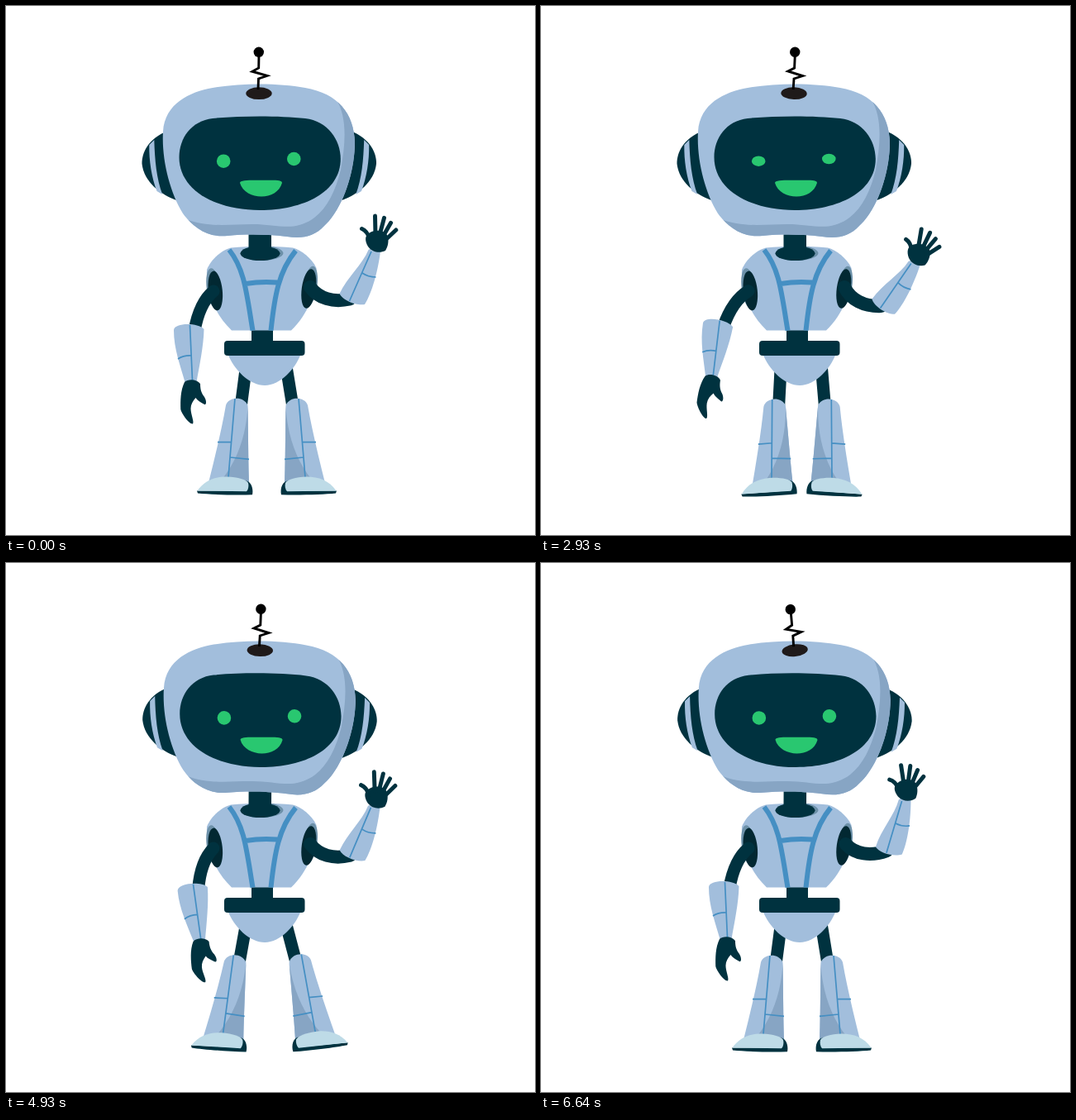
Write an HTML page that moves like this. It is 640 by 640 pixels and loops after 6710 ms.

```html
<!DOCTYPE html>
<html lang="en">
<head>
<meta charset="utf-8">
<title>Waving robot</title>
<style>
  html, body { margin: 0; width: 100%; height: 100%; overflow: hidden; background: #fff; }
  svg { display: block; width: 100vw; height: 100vh; }
  .light { fill: #a2bedc; }
  .shade { fill: #87a5c4; }
  .dark { fill: #00323f; }
  .green { fill: #29c770; }
  .rim { fill: #6d91a9; }
  .hole { fill: #022832; }
  .limb { fill: none; stroke: #00323f; stroke-linecap: round; }
  .seam { fill: none; stroke: #458fc3; stroke-width: 1.7; }
  .strap { fill: none; stroke: #458fc3; stroke-width: 6; }
</style>
</head>
<body>
<svg viewBox="0 0 640 640">
  <defs>
    <path id="skull" d="M190 152C192 118 222 104 250 99C285 93 330 93 362 99C402 106 421 130 422 165C422 200 408 245 385 266C373 279 358 282 340 279C312 276 292 276 268 278C242 281 224 265 214 251C198 225 188 185 190 152Z"/>
    <clipPath id="skullClip"><use href="#skull"/></clipPath>
    <g id="ear">
      <path class="dark" d="M196 151C172 160 164 178 164.500 191C167 213 187 228 206 235Z"/>
      <path class="light" d="M173.300 168L179.300 162C180 186 182 209 189.300 228L182.500 224C176 207 173 187 173.300 168Z"/>
    </g>
    <g id="shin">
      <path class="light" d="M266 483C269 473 287 471 292.500 483C293 512 293 548 294 579H244.500C253 545 261 512 266 483Z"/>
      <path class="shade" d="M292.500 484C291 516 281 549 261 573L294 579C293 548 293 512 292.500 484Z"/>
      <path class="seam" d="M277 475L269 570M256 527.700H273M271 546L294 548.300"/>
      <path class="dark" d="M231 586.500H289L288 574C297 574 299.500 584 298 591.300C275 592 247 591 232 589.500Z"/>
      <path fill="#bedbe7" d="M231.500 586.500C240 574 253 569.500 267 569.500C281 570 291 573 293 577C294 581 293 585 291 587.300Z"/>
    </g>
  </defs>

  <g id="legL">
    <path class="limb" stroke-width="15" d="M290.500 436L284.500 482"/>
    <use href="#shin"/>
  </g>
  <g id="legR">
    <path class="limb" stroke-width="15" d="M339 436L346.500 482"/>
    <use href="#shin" transform="translate(631 0) scale(-1 1)"/>
  </g>

  <path class="light" d="M268 420H357C351 438 332 459 313 459C295 459 276 441 268 420Z"/>
  <path class="dark" d="M297 390H323V408H297Z"/>
  <rect class="dark" x="264" y="405" width="97.500" height="18" rx="4"/>

  <path class="light" d="M272 292.500C295 290 325 290 347 292.500C357 295 370 305 375.500 317C377 342 367 371 345 392.500H273C251 371 242 345 243 319C248 306 262 295 272 292.500Z"/>
  <path class="strap" d="M270 295C289 319 291 348 298.500 392.500M350.500 296C330 321 325 350 320.500 392.500M290 336Q308 333 328 334.500"/>
  <ellipse class="rim" cx="310" cy="299" rx="25.500" ry="8.800"/>
  <ellipse class="dark" cx="307.500" cy="299.300" rx="24" ry="8.800"/>
  <ellipse class="rim" cx="251.300" cy="342" rx="8.500" ry="25" transform="rotate(-8 251.300 342)"/>
  <ellipse class="hole" cx="253.300" cy="344.500" rx="8.500" ry="24" transform="rotate(-6 253.300 344.500)"/>
  <ellipse class="rim" cx="367.800" cy="339.500" rx="8.500" ry="25" transform="rotate(9 367.800 339.500)"/>
  <ellipse class="hole" cx="366.300" cy="342" rx="8.500" ry="24" transform="rotate(8 366.300 342)"/>

  <g id="armL">
    <path class="limb" stroke-width="15" d="M251 345C239 355 232 370 228 393"/>
    <path class="light" d="M203 392C204 383 232 383 239.500 391C239 412 234 435 230.500 455H216.500C211 435 203 415 203 392Z"/>
    <path class="seam" d="M222.500 386L225.500 453M208 427Q215 422.500 224 423"/>
    <path class="dark" d="M216 455C220 451 231 451 235 457C235 463 236 468 240 473C243 478 242.500 483 240 482C235 479 231 477 229.500 474C226 478 223.500 482 223.500 487C223.500 494 228 503 226 505.500C221 506 212 492 211.300 488C211 478 211 465 216 455Z"/>
  </g>

  <g id="armR">
    <path class="limb" stroke-width="16" d="M368 340C378 354 396 359 416 354.500"/>
    <path class="light" d="M403.500 348C407 356 424 363 434 361C443 347 450 320 453 297C448 293 442 292 438.500 295C431 313 413 328 403.500 348Z"/>
    <path class="seam" d="M415.500 357L442 297M431 323Q438 328 447.500 328"/>
    <path class="dark" d="M438 291C434 284 434 278 439 275C446 270 457 271 461 277C464 284 462 291 459 296C453 299 444 299 438 291Z"/>
    <path class="limb" stroke-width="5" d="M430.500 269.500Q437 272 440 282M446.500 254L447 277M457.500 256.300L452 277M465.600 262.300L456 279M471.800 271L458 284"/>
  </g>

  <g id="head">
    <path class="dark" d="M293.500 268H321V301Q321 305.500 307 305.500Q293.500 305.500 293.500 301Z"/>
    <use href="#ear"/>
    <use href="#ear" transform="translate(612.500 0) scale(-1 1)"/>
    <use href="#skull" class="light"/>
    <path class="shade" clip-path="url(#skullClip)" d="M399 112C413 134 411 165 405 198C396 235 379 262 348 266.500C333 268 318 264 298 264C268 264 243 269 213 256V292H432V112Z"/>
    <path class="dark" d="M250 136C285 132.500 330 132.500 362 136C389 139 404.800 162 404.800 185C404.800 225 360 247 307 247C252 247 209.500 222 209.500 183C209.500 160 224 139 250 136Z"/>
    <circle id="eyeL" class="green" cx="263.200" cy="187.700" r="8.300"/>
    <circle id="eyeR" class="green" cx="348.300" cy="185" r="8.300"/>
    <path id="mouth" class="green" d="M283 214C283 210.500 294 210.800 309 210.800C324 210.800 334 210 334 214C331 225 320 230.500 309 230.500C298 230.500 286 225 283 214Z"/>
    <g id="antenna">
      <ellipse cx="306" cy="105.700" rx="15.700" ry="7.400" fill="#1f1a1a"/>
      <path fill="none" stroke="#000" stroke-width="2.900" d="M306 58L305.700 75L298 79.200L316 84.300L305.500 88L305 101"/>
      <circle cx="305.800" cy="55.800" r="6.200"/>
    </g>
  </g>
</svg>
<script>
  const LOOP = 6710, HOLD = 1070, STEP = 71.4, LAST = 79;
  const TAU = 2 * Math.PI;

  const get = id => document.getElementById(id);
  const ease = u => (1 - Math.cos(Math.PI * Math.min(1, u))) / 2;

  // Cosine with its crests at `crest` plus whole periods.
  const wave = (s, crest, period) => Math.cos(TAU * (s - crest) / period);

  // Narrow repeating bump from 0 to 1.
  const pulse = (s, crest, period) => ((1 + wave(s, crest, period)) / 2) ** 4;

  // Distance to the nearest moment of a repeating event.
  const gap = (s, at, period) => Math.abs(s - at - period * Math.round((s - at) / period));

  // One step outwards, then one inwards: 1 is fully out, -1 fully in.
  function stride(s) {
    const u = s < 35 ? s / 35 : Math.max(0, s - 40) / (LAST - 40);
    return Math.sin(TAU * u ** 1.3);
  }

  function turn(id, angle, x, y) {
    get(id).setAttribute("transform", `rotate(${angle} ${x} ${y})`);
  }

  function squash(id, y, k) {
    get(id).setAttribute("transform", `translate(0 ${y}) scale(1 ${k}) translate(0 ${-y})`);
  }

  function pose(s) {
    const start = Math.min(1, s / 6);
    const step = stride(s);

    turn("armR", start * (3.2 + 10.5 * wave(Math.min(s, 69.5), 6.9, 17.9)), 368, 335);
    turn("armL", start * (2.5 + 7.9 * wave(Math.min(s, 58.7), 5.8, 19.6)), 252, 345);
    turn("legL", step * (step > 0 ? 2.9 : 4.5), 290, 440);
    turn("legR", -step * (step > 0 ? 5.6 : 4.5), 340, 440);
    turn("head", start * (1.4 * pulse(s, 35, 24.2) - 3.6 * pulse(s, 42.1, 24.3)), 307, 292);
    turn("antenna", -6.4 * start * wave(s, 79.3, 14.1), 306, 105.7);

    const lid = 1 - start * Math.min(0.92, 1 - ease(gap(s, 13, 18) / 6));
    squash("eyeL", 187.7, lid);
    squash("eyeR", 185, lid);
    squash("mouth", 220.3, Math.max(0.12, ease(Math.abs(s - 35) / 6)));
  }

  function draw(t) {
    pose(t < HOLD ? 0 : Math.min(LAST, 1 + Math.floor((t - HOLD) / STEP)));
  }

  const begin = performance.now();
  function tick() {
    draw((performance.now() - begin) % LOOP);
    requestAnimationFrame(tick);
  }
  tick();
</script>
</body>
</html>
```
